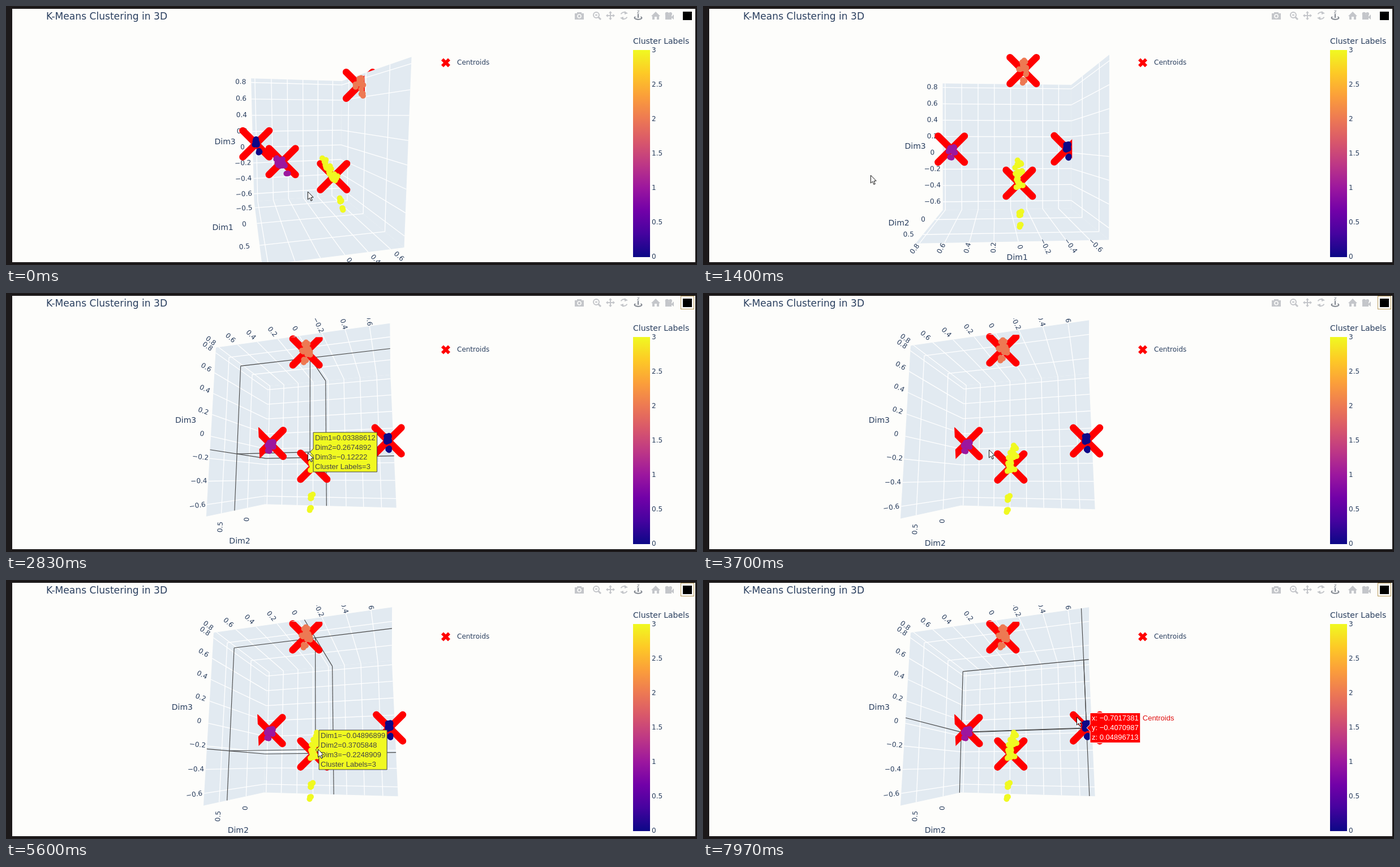
An HTML page with a canvas for the animation above (8 s loop, 1221x459 px).

```html
<!DOCTYPE html>
<html lang="en">
<head>
<meta charset="utf-8">
<title>K-Means Clustering in 3D</title>
<style>
html, body { margin: 0; width: 100%; height: 100%; overflow: hidden; background: #1c191a; }
canvas { display: block; }
</style>
</head>
<body>
<canvas id="stage" width="1221" height="459"></canvas>
<script>
const ctx = document.getElementById('stage').getContext('2d');
const LOOP = 8000, FOCAL = 495, CX = 543, CY = 250;
const PAPER = '#fdfdfb', WALL = '#e2eaf1', INK = '#2a3f5f', LINE = '#444', RED = '#f00';
const SANS = '"DejaVu Sans", sans-serif', ARIAL = '"Liberation Sans", sans-serif';
const PLASMA = ['#0d0887', '#46039f', '#7201a8', '#9c179e', '#bd3786',
  '#d8576b', '#ed7953', '#fb9f3a', '#fdca26', '#f0f921'];

// Plot box: centre and half size along Dim1, Dim2, Dim3
const MID = [0.035, 0.14, 0.075], HALF = [0.795, 0.585, 0.775];

// Each cluster is a jittered streak along rise, with stragglers at the given drops below
const clusters = [
  { at: [-0.7017, -0.4071, 0.049], rise: [0, 0, 0.045], jitter: 0.04, drops: [0.1] },
  { at: [0.7, -0.27, 0.048], rise: [0.03, -0.02, 0.03], jitter: 0.09, drops: [0.105] },
  { at: [-0.045, 0.67, 0.722], rise: [0.02, 0, 0.06], jitter: 0.07, drops: [0.1] },
  { at: [-0.037, 0.385, -0.265], rise: [0, -0.12, 0.19], jitter: 0.07, drops: [0.26, 0.28, 0.37] }
];
let seed = 1;
const noise = () => { const s = Math.sin(seed++ * 12.9898) * 43758.5453; return s - Math.floor(s) - 0.5; };
const scatter = (p, size) => p.map(v => v + size * noise());
clusters.forEach((c, n) => {
  const count = 10 + 60 * Math.hypot(...c.rise);
  c.color = PLASMA[3 * n];
  c.dots = [];
  for (let i = 0; i < count; i++) {
    const f = 1.25 * i / count - 0.25;
    c.dots.push(scatter(c.at.map((v, k) => v + f * c.rise[k]), c.jitter));
  }
  for (const d of c.drops)
    for (let i = 0; i < 3; i++)
      c.dots.push(scatter([c.at[0], c.at[1] + 0.3 * d, c.at[2] - d], 0.03));
});

// Dragging: time, azimuth, elevation, pointer x, y
const DRAG = [[0, 104, 6.5, 533, 329], [770, 46.5, 23.5, 392, 361],
  [1400, 3.1, 0.4, 296, 300], [1750, -15.4, -8.9, 251, 278]];
// Places where the pointer rests, some with a hover label
const RESTS = [
  { from: 2650, to: 3000, x: 533, y: 283, fill: PLASMA[9], ink: LINE,
    lines: ['Dim1=0.03388612', 'Dim2=0.2674892', 'Dim3=−0.12222', 'Cluster Labels=3'] },
  { from: 3400, to: 4300, x: 505, y: 278 },
  { from: 5000, to: 6250, x: 551, y: 300, fill: PLASMA[9], ink: LINE,
    lines: ['Dim1=−0.04896899', 'Dim2=0.3705848', 'Dim3=−0.2248909', 'Cluster Labels=3'] },
  { from: 7500, to: LOOP, x: 660, y: 243, fill: RED, ink: '#fff', name: 'Centroids',
    lines: ['x: −0.7017381', 'y: −0.4070987', 'z: 0.04896713'] }
];
for (const r of RESTS)
  if (r.lines) r.at = r.lines.slice(0, 3).map(s => +s.split(/=|: /)[1].replace('−', '-'));
const ROUTE = [...DRAG.map(([t, , , x, y]) => [t, x, y]),
  ...RESTS.flatMap(({ from, to, x, y }) => [[from, x, y], [to, x, y]])];

function keyed(keys, t) {
  const i = keys.findIndex(k => k[0] > t);
  if (i < 0) return keys[keys.length - 1].slice(1);
  const a = keys[i - 1], b = keys[i], f = (t - a[0]) / (b[0] - a[0]);
  return a.slice(1).map((v, n) => v + (b[n + 1] - v) * f);
}

let sinA, cosA, sinE, cosE, dist, back;

function setCamera(t) {
  const [az, el] = keyed(DRAG, t).map(v => v * Math.PI / 180);
  [sinA, cosA, sinE, cosE] = [Math.sin(az), Math.cos(az), Math.sin(el), Math.cos(el)];
  dist = 2.88 - 0.06 * Math.min(1, Math.max(0, (t - 3000) / 400));
  back = [sinA, cosA, sinE].map(v => v > 0 ? -1 : 1);
}
function toView(p) {
  const [u, v, z] = p.map((c, i) => c - MID[i]), h = u * sinA + v * cosA;
  return [v * sinA - u * cosA, z * cosE - h * sinE, dist - h * cosE - z * sinE];
}
const toScreen = ([x, y, d]) => [CX + FOCAL * x / d, CY - FOCAL * y / d];
const project = p => toScreen(toView(p));
const side = (i, s) => MID[i] + s * HALF[i];
const put = (p, i, v) => { const q = p.slice(); q[i] = v; return q; };

function trace(pts) {
  pts.forEach(([x, y], i) => i ? ctx.lineTo(x, y) : ctx.moveTo(x, y));
}
function stroke(pts, color, width) {
  ctx.beginPath(); trace(pts);
  ctx.strokeStyle = color; ctx.lineWidth = width; ctx.stroke();
}
function polygon(pts, color) {
  ctx.beginPath(); trace(pts); ctx.closePath();
  ctx.fillStyle = color; ctx.fill();
}
function box(x, y, w, h, color) {
  ctx.fillStyle = color; ctx.fillRect(x, y, w, h);
}
function disc(x, y, r, color) {
  ctx.beginPath(); ctx.arc(x, y, r, 0, 7);
  ctx.fillStyle = color; ctx.fill();
}
function arc(x, y, rx, ry, from, to, color) {
  ctx.beginPath(); ctx.ellipse(x, y, rx, ry, 0, from, to);
  ctx.strokeStyle = color; ctx.lineWidth = 2; ctx.stroke();
}
function cross(x, y, r, width) {
  for (const s of [-1, 1]) stroke([[x - r, y - s * r], [x + r, y + s * r]], RED, width);
}
function text(str, x, y, size, color = INK, align = 'left', family = SANS) {
  ctx.font = size + 'px ' + family;
  ctx.fillStyle = color; ctx.textAlign = align; ctx.textBaseline = 'middle';
  ctx.fillText(str, x, y);
}

// Foreshortened axes use wider tick spacing
function ticks(k) {
  const step = k < 2 && Math.abs(k ? sinA : cosA) < 0.4 ? 0.5 : 0.2, out = [];
  for (let n = Math.ceil(side(k, -1) / step); n * step < side(k, 1); n++) out.push(n * step);
  return out;
}
const format = v => Math.abs(v) < 0.01 ? '0' : v.toFixed(1).replace('-', '−');

function wallCorners(k) {
  const i = (k + 1) % 3, j = (k + 2) % 3;
  return [[-1, -1], [1, -1], [1, 1], [-1, 1]].map(([a, b]) => {
    const p = [];
    p[k] = side(k, back[k]); p[i] = side(i, a); p[j] = side(j, b);
    return p;
  });
}
// Line on the wall normal to k, through p, running along axis i
function acrossWall(p, k, i, color, width) {
  const w = put(p, k, side(k, back[k]));
  stroke([-1, 1].map(s => project(put(w, i, side(i, s)))), color, width);
}
function drawWalls() {
  for (let k = 0; k < 3; k++) polygon(wallCorners(k).map(project), WALL);
  for (let k = 0; k < 3; k++)
    for (const i of [(k + 1) % 3, (k + 2) % 3])
      for (const v of ticks(i)) acrossWall(put(MID, i, v), k, 3 - k - i, '#fff', 1.3);
}

function drawAxis(k, base, out, sign) {
  const shift = (p, d) => put(p, out, p[out] + sign * d);
  for (const v of ticks(k)) {
    const p = put(base, k, v), [x0, y0] = project(p), [x, y] = project(shift(p, 0.125));
    ctx.save();
    ctx.translate(x, y);
    ctx.rotate(Math.atan((y - y0) / (x - x0)));
    text(format(v), 0, 0, 12, INK, 'center');
    ctx.restore();
  }
  const [x, y] = project(shift(put(base, k, MID[k]), 0.33));
  text('Dim' + (k + 1), x, y, 14, INK, 'center');
}
function drawAxes() {
  const [b0, b1, b2] = back;
  drawAxis(0, [0, side(1, -b1), side(2, b2)], 1, -b1);
  if (b2 < 0) drawAxis(1, [side(0, -b0), 0, side(2, -1)], 0, -b0);
  else drawAxis(1, [side(0, b0), 0, side(2, -1)], 2, -1);
  const p = [side(0, b0), side(1, -b1), MID[2]], q = [side(0, -b0), side(1, b1), MID[2]];
  if (project(p)[0] < project(q)[0]) drawAxis(2, p, 1, -b1);
  else drawAxis(2, q, 0, -b0);
}

function drawSpikes(p) {
  for (let k = 0; k < 3; k++) {
    acrossWall(p, k, (k + 1) % 3, LINE, 1.1);
    acrossWall(p, k, (k + 2) % 3, LINE, 1.1);
    stroke([project(p), project(put(p, k, side(k, back[k])))], LINE, 1.1);
  }
}

// Part of a polygon in view space that is nearer than the given depth
function nearer(poly, depth) {
  const out = [];
  poly.forEach((a, n) => {
    const b = poly[(n + 1) % poly.length];
    if (a[2] < depth) out.push(a);
    if ((a[2] < depth) !== (b[2] < depth)) {
      const f = (depth - a[2]) / (b[2] - a[2]);
      out.push(a.map((v, i) => v + (b[i] - v) * f));
    }
  });
  return out;
}
// Flat marker, hidden where a wall passes in front of it
function drawCentroid(p) {
  const view = toView(p);
  ctx.save();
  for (let k = 0; k < 3; k++) {
    const hidden = nearer(wallCorners(k).map(toView), view[2]);
    if (hidden.length < 3) continue;
    ctx.beginPath();
    ctx.rect(0, 0, 1221, 459);
    trace(hidden.map(toScreen));
    ctx.closePath();
    ctx.clip('evenodd');
  }
  ctx.lineCap = 'round';
  cross(...toScreen(view), 23.3, 12.5);
  ctx.restore();
}
function drawClusters() {
  const depth = c => toView(c.at)[2];
  for (const c of clusters.slice().sort((a, b) => depth(b) - depth(a))) {
    drawCentroid(c.at);
    for (const p of c.dots) disc(...project(p), 5, c.color);
  }
}

function drawHover({ at, fill, ink, lines, name }) {
  const [px, py] = project(at).map(Math.round);
  ctx.font = '13px ' + ARIAL;
  const w = Math.max(...lines.map(s => ctx.measureText(s).width)) + 6, h = lines.length * 17 + 2;
  const x = px + 6, y = py - h / 2;
  const shape = [[px, py], [x, py - 6], [x, y], [x + w, y], [x + w, y + h], [x, y + h], [x, py + 6], [px, py]];
  polygon(shape, fill);
  stroke(shape, ink, 1);
  lines.forEach((s, i) => text(s, x + 3, y + 10 + i * 17, 13, ink, 'left', ARIAL));
  if (name) text(name, x + w + 4, y + 10, 13, '#e01010', 'left', ARIAL);
}

function drawPointer(x, y) {
  ctx.save();
  ctx.translate(x, y);
  const arrow = [[0.5, 0], [0.5, 14], [3.8, 11], [6, 16.3], [8.3, 15.3], [6.1, 10.2], [10.3, 10], [0.5, 0]];
  polygon(arrow, '#fff');
  stroke(arrow, '#111', 1);
  ctx.restore();
}

// Icons are drawn around their own centre
const icons = {
  1013: c => { box(-8, -4, 16, 11, c); box(-4, -6, 8, 3, c); disc(0, 1, 3.8, PAPER); disc(0, 1, 2.2, c); },
  1044: c => { arc(-1, -1, 5, 5, 0, 7, c); stroke([[2, 2], [7, 7]], c, 3); box(-3, -2, 4, 2, c); },
  1068: c => {
    for (let i = 0; i < 4; i++) {
      ctx.rotate(Math.PI / 2);
      box(0, -1, 6, 2, c);
      polygon([[8, 0], [4.5, -3], [4.5, 3]], c);
    }
  },
  1092: c => {
    for (let i = 0; i < 2; i++) {
      ctx.rotate(Math.PI);
      arc(0, 0, 6, 6, -2.7, -0.9, c);
      polygon([[1, -8], [7, -4], [1, -2]], c);
    }
  },
  1117: c => { text('z', 0, -6, 9, c, 'center'); box(-1, -3, 2, 7, c); arc(0, 4, 6.5, 2.6, -0.8, 3.9, c); },
  1148: c => { polygon([[0, -7], [8, 1], [-8, 1]], c); box(-6, 0, 4, 7, c); box(2, 0, 4, 7, c); box(-2, 0, 4, 2, c); },
  1172: c => { box(-7, -1, 11, 8, c); disc(-4, -3, 3.3, c); disc(2, -3, 3, c); polygon([[3, 3], [8, -2], [8, 7]], c); }
};
function drawModebar(focused) {
  for (const x in icons) {
    ctx.save();
    ctx.translate(+x, 17);
    icons[x](x === '1117' ? '#7d838c' : '#c4c6ca');
    ctx.restore();
  }
  if (focused) {
    ctx.strokeStyle = '#b99a5c'; ctx.lineWidth = 1;
    ctx.strokeRect(1192.5, 5.5, 23, 23);
  }
  box(1196, 10, 16, 15, '#000');
}

function drawKeys() {
  text('K-Means Clustering in 3D', 71, 19.5, 17.1);
  text('Cluster Labels', 1108, 63.5, 14);
  const ramp = ctx.createLinearGradient(0, 444, 0, 78);
  PLASMA.forEach((c, i) => ramp.addColorStop(i / 9, c));
  box(1108, 78, 30, 367, ramp);
  for (let v = 0; v <= 3; v += 0.5) text(String(v), 1141, 445 - v * 122.2, 12);
  cross(777, 100.5, 6, 5.6);
  text('Centroids', 797, 101, 12);
}

function draw(t) {
  setCamera(t);
  box(0, 0, 1221, 459, '#1c191a');
  box(11, 5, 1207, 449, PAPER);
  const hover = RESTS.find(r => r.lines && t >= r.from && t < r.to);
  ctx.save();
  ctx.beginPath(); ctx.rect(71, 45, 944, 409); ctx.clip();
  drawWalls();
  drawAxes();
  if (hover) drawSpikes(hover.at);
  drawClusters();
  ctx.restore();
  drawKeys();
  drawModebar(t > 2100);
  if (hover) drawHover(hover);
  drawPointer(...keyed(ROUTE, t));
}

const start = performance.now();
function tick() {
  draw((performance.now() - start) % LOOP);
  requestAnimationFrame(tick);
}
tick();
</script>
</body>
</html>
```
